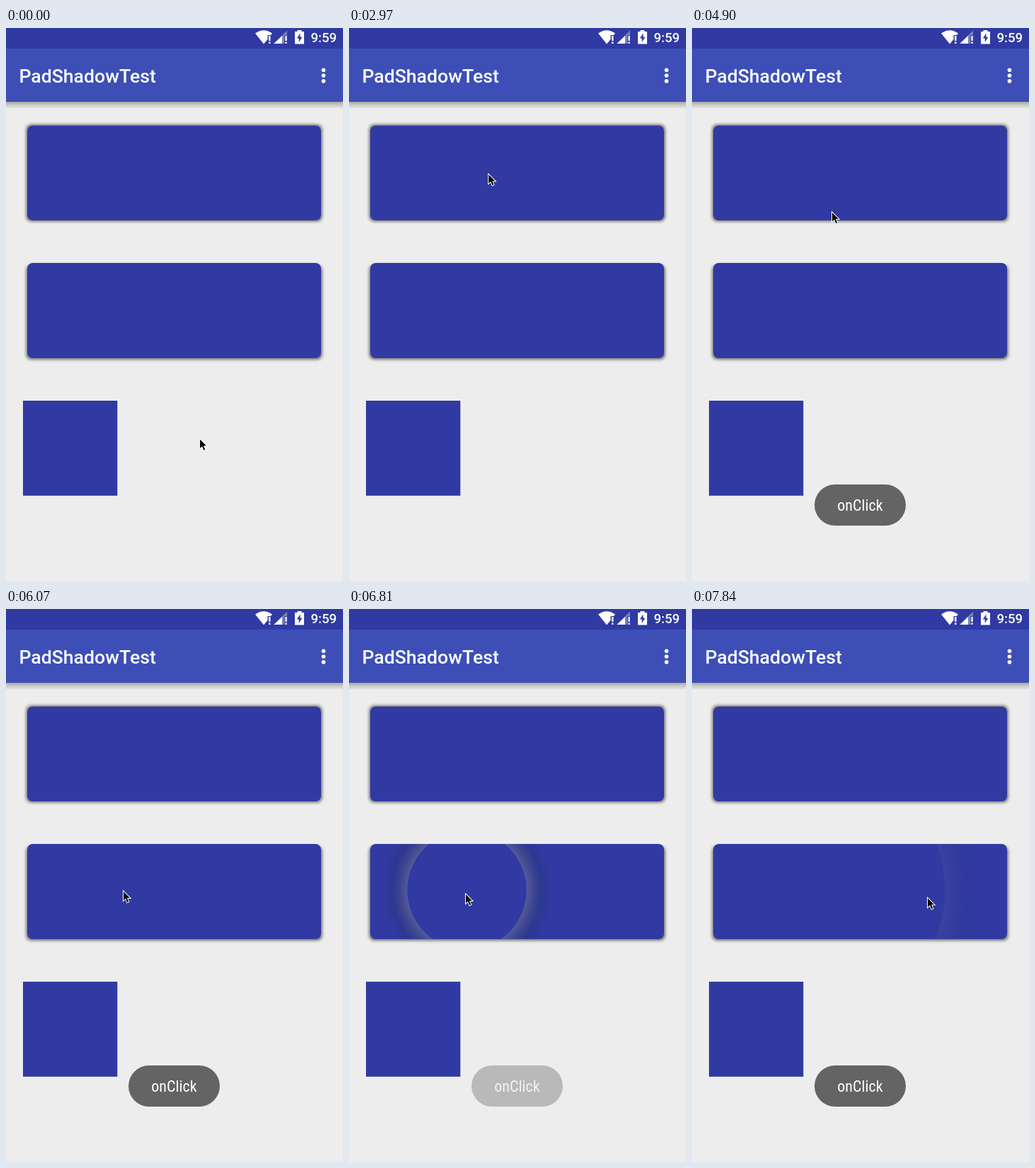
An HTML page for the animation above (7990 ms loop, 476 px wide and 779 px high).

```html
<!DOCTYPE html>
<html lang="en">
<head>
<meta charset="utf-8">
<title>Touch effects</title>
<style>
  html, body { margin: 0; width: 100%; height: 100%; overflow: hidden; background: #ededed; }
  svg { display: block; width: 476px; height: 779px; }
  text { font-family: Roboto, sans-serif; fill: #fff; }
  .medium { font-weight: 500; }
  .toast { font-family: "Roboto Condensed", Roboto, sans-serif; font-stretch: 75%; font-size: 22px; }
  .fill { fill: #303aa2; }
</style>
</head>
<body>
<svg viewBox="0 0 476 779">
  <defs>
    <filter id="blur" x="-10%" y="-20%" width="120%" height="140%"><feGaussianBlur stdDeviation="2.2"/></filter>
    <linearGradient id="barShadow" x2="0" y2="1">
      <stop stop-color="#a9a9a5"/><stop offset=".5" stop-color="#cacac8"/><stop offset="1" stop-color="#e4e4e3"/>
    </linearGradient>
    <radialGradient id="glow" gradientUnits="userSpaceOnUse" cx="166.5" cy="396" r="1">
      <stop stop-color="#777b8c" stop-opacity="0"/>
      <stop stop-color="#777b8c" stop-opacity=".48"/>
      <stop stop-color="#4a537f" stop-opacity=".5"/>
      <stop stop-color="#273374" stop-opacity=".36"/>
      <stop stop-color="#273374" stop-opacity="0"/>
    </radialGradient>
    <clipPath id="clip1"><rect x="30" y="137.5" width="415" height="133.5" rx="8"/></clipPath>
    <clipPath id="clip2"><rect x="30" y="331" width="415" height="134" rx="8"/></clipPath>
  </defs>

  <rect width="476" height="779" fill="#ededed"/>
  <rect y="104" width="476" height="9" fill="url(#barShadow)"/>
  <rect y="29" width="476" height="75" fill="#3d4fb7"/>
  <rect width="476" height="29" class="fill"/>
  <text x="18.5" y="77" font-size="26.6" class="medium">PadShadowTest</text>
  <g fill="#fff">
    <circle cx="448.5" cy="59.2" r="2.8"/><circle cx="448.5" cy="67" r="2.8"/><circle cx="448.5" cy="74.8" r="2.8"/>
    <path d="M352 7.5Q364 -1 376 7.5L374 10H369.5V16L364 22.5Z"/>
    <path d="M371 11h2.5v7h-2.5zM371 19.5h2.5v2.5h-2.5z"/>
    <path d="M397 3.5V10H393.5V22H378Z" opacity=".35"/>
    <path d="M390 11V22H378.5Z"/>
    <path d="M394.5 11h2.2v7h-2.2zM394.5 19.5h2.2v2.5h-2.2z"/>
    <path d="M411.5 3h6v2h3.5v17.5h-13V5h3.5z"/>
  </g>
  <path d="M415.5 7.5L410.8 14.5H413.7V20L418.4 12.8H415.5Z" class="fill"/>
  <text x="430.5" y="20" font-size="18.6" class="medium">9:59</text>

  <g fill="#555550" opacity=".85" filter="url(#blur)">
    <rect x="28.5" y="136" width="418" height="136.5" rx="7"/>
    <rect x="28.5" y="334" width="418" height="133" rx="7"/>
  </g>
  <g clip-path="url(#clip1)">
    <rect x="30" y="137" width="415" height="135" class="fill"/>
    <rect id="shade" x="30" y="137" width="415" height="135" fill="#2c3692"/>
    <circle id="ripple" cx="196.5" cy="204" fill="#283285"/>
  </g>
  <g clip-path="url(#clip2)">
    <rect x="30" y="331" width="415" height="134" class="fill"/>
    <circle id="ring" cx="166.5" cy="396" fill="url(#glow)"/>
  </g>
  <rect x="24" y="525" width="133.3" height="133.8" class="fill"/>

  <g id="toast">
    <rect x="173" y="643" width="129" height="58" rx="29" fill="#646464"/>
    <text x="237.5" y="680" text-anchor="middle" class="toast">onClick</text>
  </g>

  <path id="cursor" d="M1 2V14.4L4 11.7L6.3 17.2L8.2 16.4L6 11.1H10Z" stroke="#fff" stroke-width="2" paint-order="stroke"/>
</svg>
<script>
const LOOP = 7990, STEP = 147.95, LAST = 53;
const [shade, ripple, ring, glow, toast, cursor] =
  ["shade", "ripple", "ring", "glow", "toast", "cursor"].map(id => document.getElementById(id));

const ramp = (k, from, to) => Math.min(1, Math.max(0, (k - from) / (to - from)));
const easeOut = u => 1 - (1 - u) ** 2;

// The pointer glides to each place in turn and rests between moves.
const home = { x: 273, y: 577.5 };
const moves = [
  { from: 0, to: 7, x: 219, y: 244 },
  { from: 7, to: 10, x: 212, y: 227 },
  { from: 10, to: 14, x: 200, y: 211 },
  { from: 17, to: 21, x: 196, y: 204 },
  { from: 27, to: 33, x: 197, y: 258 },
  { from: 33, to: 37, x: 178, y: 414 },
  { from: 37, to: 41, x: 165, y: 396 },
  { from: 43, to: 46, x: 164, y: 400 },
  { from: 50, to: 53, x: 332, y: 405.5 }
];

function pointerAt(k) {
  return moves.reduce((p, move) => {
    const u = easeOut(ramp(k, move.from, move.to));
    return { x: p.x + (move.x - p.x) * u, y: p.y + (move.y - p.y) * u };
  }, home);
}

function drawRipple(k) {
  const left = 1 - ramp(k, 30, 33);
  shade.setAttribute("opacity", k < 26 ? 0 : left);
  ripple.setAttribute("r", Math.max(0, 59.3 * (k - 27)));
  ripple.setAttribute("opacity", .7 * left);
}

function drawRing(k) {
  const inner = Math.max(0, 84.5 + 15.2 * (k - 46)), width = 22 + inner * .17, outer = inner + width;
  const offsets = [inner - .8, inner, inner + width * .28, inner + width * .6, outer];
  glow.setAttribute("r", outer);
  [...glow.children].forEach((stop, i) => stop.setAttribute("offset", Math.max(0, offsets[i] / outer)));
  ring.setAttribute("r", outer);
  ring.setAttribute("opacity", k < 43 ? 0 : 1 - .72 * easeOut(ramp(k, 46, 53)));
}

function draw(time) {
  const k = Math.min(LAST, Math.floor((time % LOOP + 10) / STEP));
  const { x, y } = pointerAt(k);
  cursor.setAttribute("transform", `translate(${x} ${y})`);
  toast.setAttribute("opacity", ramp(k, 29.6, 32.6) - ramp(k, 44, 47.2) + ramp(k, 47, 50));
  drawRipple(k);
  drawRing(k);
}

const start = performance.now();
function tick() {
  draw(performance.now() - start);
  requestAnimationFrame(tick);
}
tick();
</script>
</body>
</html>
```
